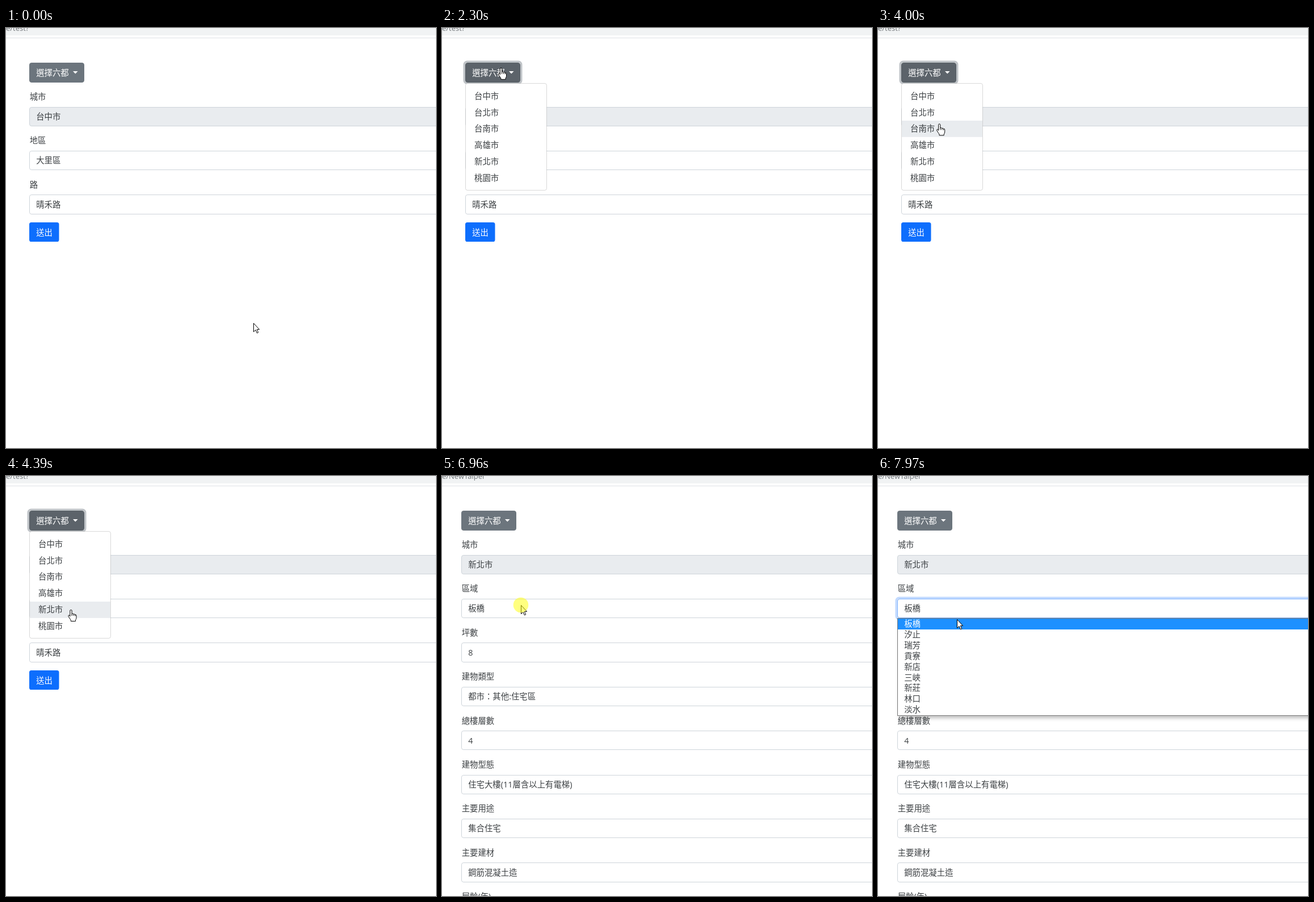
These frames come from a looping animation (758x739 px, 8 s). An HTML page:

```html
<!DOCTYPE html>
<html lang="zh-Hant">
<head>
<meta charset="utf-8">
<title>選擇六都</title>
<style>
html, body { margin: 0; width: 100%; height: 100%; overflow: hidden; background: #fff; }
svg { display: block; }
text { font: 14.4px "Open Sans", "Noto Sans CJK TC", "Noto Sans CJK", sans-serif; fill: #212529; fill-opacity: .88; white-space: pre; }
text.url { font-size: 13px; fill: #5f6368; }
text.light { fill: #fff; fill-opacity: 1; }
.field { fill: #fff; stroke: #ced4da; }
.off { fill: #e9ecef; }
#list { filter: drop-shadow(3px 4px 3px rgba(0, 0, 0, .25)); }
</style>
</head>
<body>
<svg id="stage" width="758" height="739" viewBox="0 0 758 739"></svg>
<script>
const LOOP = 8000;
const ROW_H = 77.4, FIELD_TOP = 138.6, FIELD_H = 34.2;
const ITEM_TOP = 105.4, ITEM_H = 28.8;
const OPT_TOP = 251, OPT_H = 18.9;
const cities = ['台中市', '台北市', '台南市', '高雄市', '新北市', '桃園市'];
const areas = ['板橋', '汐止', '瑞芳', '貢寮', '新店', '三峽', '新莊', '林口', '淡水'];
const formA = [['城市', '台中市'], ['地區', '大里區'], ['路', '晴禾路']];
const formB = [['城市', '新北市'], ['區域', '板橋'], ['坪數', '8'], ['建物類型', '都市：其他:住宅區'],
  ['總樓層數', '4'], ['建物型態', '住宅大樓(11層含以上有電梯)'], ['主要用途', '集合住宅'],
  ['主要建材', '鋼筋混凝土造'], ['屋齡(年)', '']];

// Eased pointer glides; bow bends the path sideways halfway
const home = [436, 519];
const glides = [
  { at: 520, end: 1130, to: [70, 354], bow: [-120, -140] },
  { at: 1280, end: 1750, to: [104, 67] },
  { at: 2300, end: 2990, to: [105, 170] },
  { at: 3160, end: 3310, to: [104, 148] },
  { at: 3460, end: 3850, to: [108, 200] },
  { at: 3930, end: 4240, to: [110, 150], bow: [0, -45] },
  { at: 4310, end: 4390, to: [114.5, 235] },
  { at: 6020, end: 6570, to: [102, 348] },
  { at: 6630, end: 6710, to: [136, 215] },
  { at: 6860, end: 6860, to: [139, 227] },
  { at: 7500, end: 7970, to: [139, 252], bow: [0, 34] }
];
const clicks = [[1920, 2080], [5780, 5940], [6860, 7110]];

const text = (x, mid, s, cls = '') => `<text x="${x}" y="${mid + 5}" class="${cls}">${s}</text>`;
const rect = (x, y, w, h, more = '') => `<rect x="${x}" y="${y}" width="${w}" height="${h}" ${more}/>`;

function form(left, rows, url, id) {
  let s = `<g id="${id}">` + text(0, 0, url, 'url');
  s += rect(left - 1.7, 59.3, 100.4, 38, `id="${id}Ring" rx="5" fill="none" stroke="#828a91" stroke-opacity=".5" stroke-width="3.6"`);
  s += rect(left + .5, 61.5, 96, 34, `id="${id}Btn" rx="3.4" fill="#6c757d" stroke="#6c757d"`);
  s += text(left + 12.2, 78.5, '選擇六都', 'light');
  s += `<path d="M${left + 77} 76h8.6l-4.3 4.4z" fill="#fff"/>`;
  rows.forEach(([label, value], i) => {
    const y = FIELD_TOP + ROW_H * i;
    const top = Math.round(y), bottom = Math.round(y + FIELD_H);
    s += text(left + .7, y - 17.6, label);
    s += rect(left + .5, top + .5, 900, bottom - top - 1, `rx="3.4" class="field ${i ? '' : 'off'}"`);
    s += text(left + 12.2, y + 17.4, value);
  });
  return s;
}

function cityMenu() {
  return '<g id="menu">' + rect(41.5, 97.5, 143, 188, 'rx="3.4" fill="#fff"') +
    rect(42, 0, 142, ITEM_H, 'id="itemBar"') +
    rect(41.5, 97.5, 143, 188, 'rx="3.4" fill="none" stroke="#000" stroke-opacity=".15"') +
    cities.map((c, i) => text(57, 119.7 + ITEM_H * i, c, 'item')).join('') + '</g>';
}

function areaList() {
  return '<g id="open">' +
    rect(32.2, 214.2, 900, 37.6, 'rx="5" fill="none" stroke="#0d6efd" stroke-opacity=".25" stroke-width="3.6"') +
    rect(34.5, 216.5, 900, 33, 'rx="3.4" fill="none" stroke="#86b7fe"') +
    rect(34.5, 250.5, 800, 171, 'id="list" fill="#fff" stroke="#767676"') +
    rect(35, 0, 800, 19, 'id="optBar" fill="#1e90ff"') +
    areas.map((a, i) => text(46.2, 260 + OPT_H * i, a, 'opt')).join('') + '</g>';
}

const stage = document.getElementById('stage');
stage.innerHTML = rect(0, 0, 758, 739, 'fill="#fff"') + rect(0, 0, 758, 13, 'fill="#f1f3f4"') +
  rect(0, 17, 758, 1, 'fill="#dee1e6"') +
  form(41, formA, 'e/test?', 'a') +
  rect(41, 342, 52.5, 34, 'id="send" rx="3.6"') + text(53.2, 359.5, '送出', 'light') + cityMenu() + '</g>' +
  form(34, formB, 'e/NewTaipei', 'b') + areaList() + '</g>' +
  `<g id="pointer" stroke="#000" stroke-linejoin="round" fill="#fff">
    <path id="arrow" d="M.5.5V15.6L4 12.3 6.4 17.8 8.7 16.8 6.3 11.4H10.6Z"/>
    <g id="hand">
      <path d="M-1.6 12V2Q-1.6.5 0 .5T1.6 2V7.5Q3.7 6.3 4.6 8.2 6.6 7.2 7.3 9 9.5 8.4 9.5 11V14.5Q9.5 16.6 8 18.5V20.5H-.2V18.5Q-1.5 16.8-4.3 12.3-5.3 10.3-3.6 9.8-2.5 9.8-1.6 12Z"/>
      <path d="M1.6 7.5V11M4.6 8.3V11M7.3 9.2V11.4" fill="none"/>
    </g>
  </g>
  <circle id="spot" r="13.3" fill="#ff0" fill-opacity=".5"/>`;

const $ = id => document.getElementById(id);
const show = (id, on) => $(id).setAttribute('display', on ? 'inline' : 'none');
const set = (id, attrs) => { for (const k in attrs) $(id).setAttribute(k, attrs[k]); };
const tint = (cls, on) => document.querySelectorAll('.' + cls)
  .forEach((el, i) => el.classList.toggle('light', i === on));
const ease = u => u * u * (3 - 2 * u);

function place(t) {
  const i = glides.findLastIndex(g => g.at <= t);
  if (i < 0) return home;
  const { at, end, to, bow = [0, 0] } = glides[i];
  const from = i ? glides[i - 1].to : home;
  const gaps = Math.round((end - at) / 78);
  const step = Math.min(gaps, Math.floor((t - at) / (end - at || 1) * gaps + 1e-6));
  const u = (step + 1) / (gaps + 1);
  return to.map((v, k) => from[k] + (v - from[k]) * ease(u) + bow[k] * Math.sin(Math.PI * u));
}

function draw(t) {
  const [x, y] = place(t);
  const second = t >= 6020;
  const menu = t >= 2000 && t < 5860;
  const focus = t >= 1920 && t < 5860;
  const inside = (l, top, r, b) => x >= l && x < r && y >= top && y < b;
  const onBtn = !second && inside(41, 61, 138, 95);
  const onSend = !second && inside(41, 342, 93, 376);
  const row = Math.floor((y - ITEM_TOP) / ITEM_H);
  const onItem = menu && inside(42, ITEM_TOP, 184, ITEM_TOP + 6 * ITEM_H);
  const active = onItem && t >= 5780;
  const dark = focus || onBtn;

  show('a', !second);
  show('b', second);
  show('aRing', focus);
  show('bRing', false);
  set('aBtn', { fill: dark ? '#5c636a' : '#6c757d', stroke: dark ? '#565e64' : '#6c757d' });
  set('send', { fill: onSend ? '#0b5ed7' : '#0d6efd' });

  show('menu', menu);
  show('itemBar', onItem);
  set('itemBar', { y: Math.round(ITEM_TOP + ITEM_H * row), fill: active ? '#0d6efd' : '#e9ecef' });
  tint('item', active ? row : -1);

  const opt = Math.max(0, Math.floor((y - OPT_TOP) / OPT_H));
  show('open', t >= 7030);
  set('optBar', { y: Math.round(OPT_TOP + OPT_H * opt) });
  tint('opt', opt);

  const hand = onBtn || onSend || onItem;
  show('hand', hand);
  show('arrow', !hand);
  set('pointer', { transform: `translate(${x} ${y})` });
  show('spot', clicks.some(([on, off]) => t >= on && t < off));
  set('spot', { cx: x, cy: y });
}

const start = performance.now();
function tick() {
  draw((performance.now() - start) % LOOP);
  requestAnimationFrame(tick);
}
draw(0);
requestAnimationFrame(tick);
</script>
</body>
</html>
```
